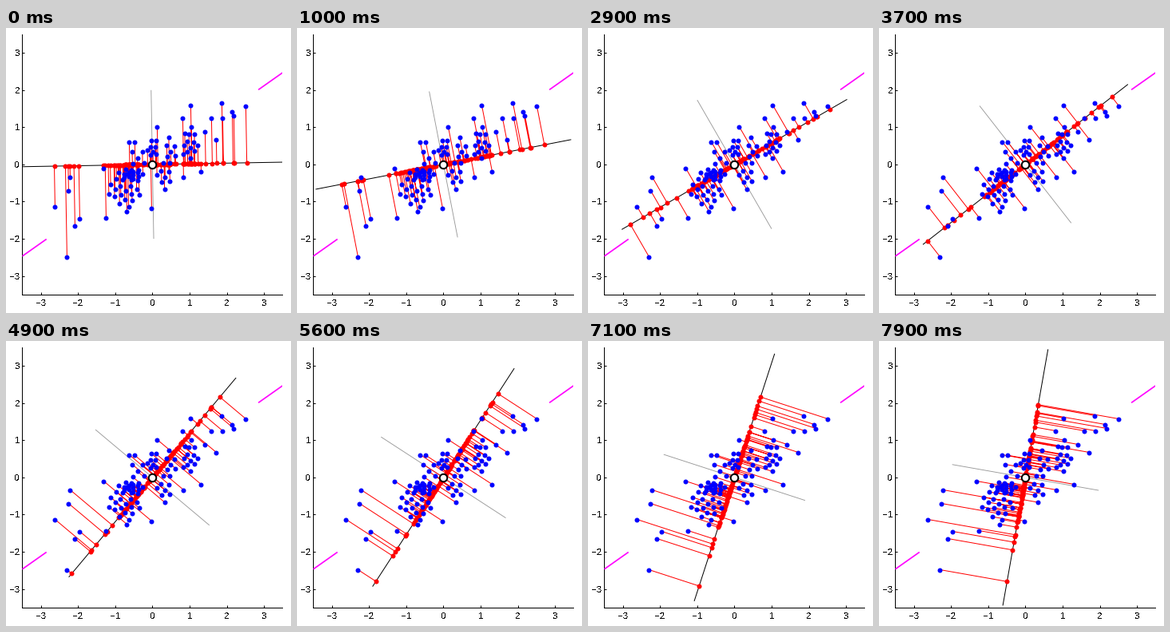
A matplotlib script that plays this animation: 357x357 px, repeating every 8000 ms.

```python
import numpy as np
import matplotlib.pyplot as plt
from matplotlib.animation import FuncAnimation

SIZE, DPI = 357, 100
FRAMES, STEP_MS = 80, 100
PX = 72 / DPI            # one pixel in points
LIMIT = 3.5
SIDE = 326               # plot width in pixels
UNIT = SIDE / (2 * LIMIT)
CENTER = np.array([183, 170.4])
TREND = 0.705            # slope of the principal axis

# Outer points of the cloud, in stage pixels
OUTLIERS = [
    (61, 223), (76, 286), (80, 186), (78, 203), (86, 247), (92, 238),
    (122, 175), (125, 237), (151, 229), (154, 142), (182, 225), (189, 123),
    (222, 186), (221, 112), (231, 96), (244, 179), (249, 129), (257, 112),
    (263, 139), (270, 93), (271, 112), (283, 104), (285, 109), (300, 97),
]


def cluster(x, y, rx, ry, n):
    """Fill an ellipse with n points along a golden-angle spiral."""
    k = np.arange(n) + 0.5
    r, a = np.sqrt(k / n), k * np.pi * (3 - np.sqrt(5))
    return np.column_stack([x + rx * r * np.cos(a), y + ry * r * np.sin(a)])


pixels = np.vstack([
    OUTLIERS,
    cluster(148, 200, 22, 24, 22),
    cluster(158, 182, 14, 8, 12),
    cluster(163, 158, 12, 18, 6),
    cluster(183, 151, 7, 14, 8),
    cluster(198, 182, 11, 20, 9),
    cluster(205, 150, 9, 16, 6),
    cluster(230, 145, 11, 22, 13),
])
points = (pixels - CENTER) * [1, -1] / UNIT

fig = plt.figure(figsize=(SIZE / DPI, SIZE / DPI), dpi=DPI, facecolor="white")
ax = fig.add_axes([20.4 / SIZE, 23.1 / SIZE, SIDE / SIZE, SIDE / SIZE])
ax.set(xlim=(-LIMIT, LIMIT), ylim=(-LIMIT, LIMIT))
ax.spines[["top", "right"]].set_visible(False)
for side in ("left", "bottom"):
    ax.spines[side].set_linewidth(PX)

ticks = range(-3, 4)
names = [str(t).replace("-", "\u2212") for t in ticks]
ax.set_xticks(ticks, names)
ax.set_yticks(ticks, names)
ax.tick_params(direction="in", length=3 * PX, width=PX)
ax.tick_params(axis="x", pad=6 * PX)
ax.tick_params(axis="y", pad=3 * PX)
for label in ax.get_xticklabels() + ax.get_yticklabels():
    label.set(family="Liberation Sans", size=11.5 * PX, antialiased=False)


def line(color, width, z):
    return ax.plot([], [], color=color, lw=width * PX,
                   solid_capstyle="butt", zorder=z)[0]


def dots(color, z):
    return ax.plot([], [], "o", color=color, ms=6 * PX, mew=0,
                   snap=False, zorder=z)[0]


axis_line = line("black", 1, 3)
normal = line("#999999", 0.9, 3.1)
links = line("red", 1, 4)
shadows = dots("red", 5)
dots("blue", 6).set_data(*points.T)
for sign in (-1, 1):
    x = sign * np.array([2.85, LIMIT])
    line("magenta", 1.7, 3).set_data(x, TREND * x)
ax.plot(0, 0, "o", mfc="white", mec="black", ms=9.5 * PX, mew=2 * PX,
        snap=False, zorder=7)

ends = np.array([-1, 1])
gaps = np.full(len(points), np.nan)


def update(i):
    a = np.radians(i + 1)
    w = np.array([np.cos(a), np.sin(a)])
    proj = np.outer(points @ w, w)
    axis_line.set_data(LIMIT * ends * w[0], LIMIT * ends * w[1])
    normal.set_data(-2 * ends * w[1], 2 * ends * w[0])
    shadows.set_data(*proj.T)
    links.set_data(*[np.column_stack([points[:, k], proj[:, k], gaps]).ravel()
                     for k in (0, 1)])
    return axis_line, normal, links, shadows


anim = FuncAnimation(fig, update, frames=FRAMES, interval=STEP_MS,
                     repeat=True, repeat_delay=0)
plt.show()
```
